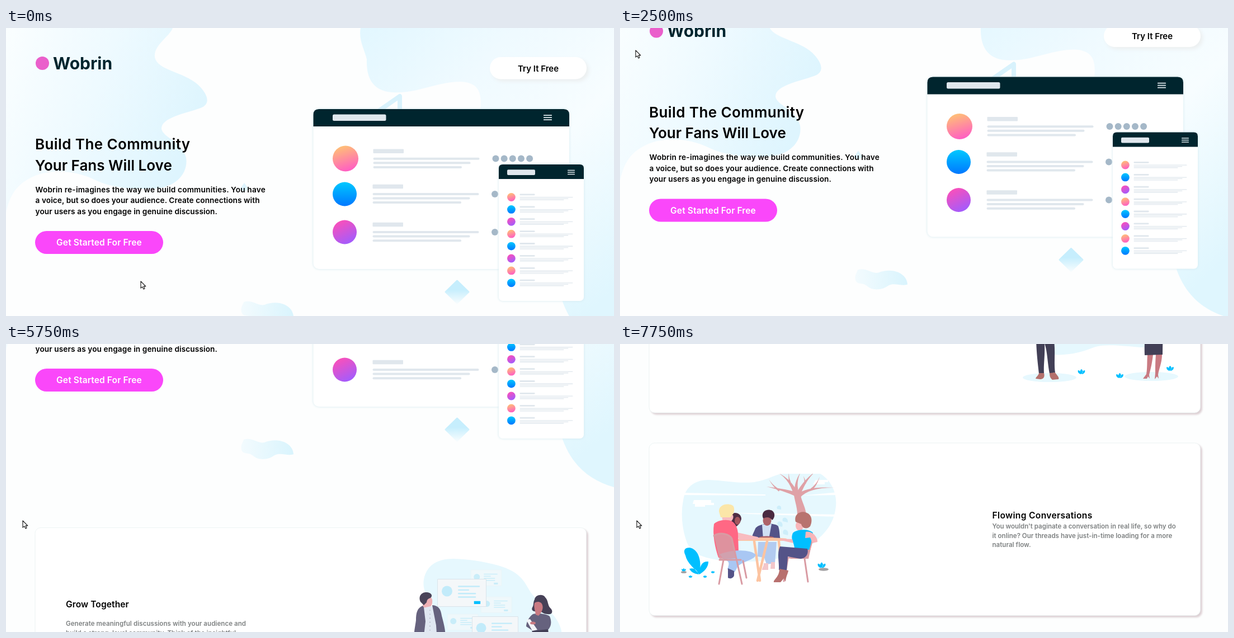
An HTML page for the animation above (8 s loop, 1087 by 515 pixels).

```html
<!DOCTYPE html>
<html lang="en">
<head>
<meta charset="utf-8">
<title>Landing page scroll</title>
<style>
  html, body { margin: 0; width: 100%; height: 100%; overflow: hidden; background: #fdfefe; }
  svg { display: block; width: 100%; height: 100%; }
  text { font-family: Inter, "Open Sans", sans-serif; font-weight: 600; white-space: pre; }
  .soft { filter: drop-shadow(0 0 2px #d3e8ee); }
  .pill { filter: drop-shadow(4px 4px 3px #eceff0); }
  .card { filter: drop-shadow(3.5px 3.5px 1.5px #ddd0d4); }
</style>
</head>
<body>
<svg viewBox="0 0 1087 515" preserveAspectRatio="none">
  <defs>
    <linearGradient id="left" x1="0" y1="0" x2="1" y2=".35">
      <stop offset="0" stop-color="#fafeff"/><stop offset=".5" stop-color="#eefaff"/><stop offset="1" stop-color="#def5fe"/>
    </linearGradient>
    <linearGradient id="right" x1="0" y1="0" x2=".75" y2="1">
      <stop offset="0" stop-color="#e2f7ff"/><stop offset=".3" stop-color="#effaff"/>
      <stop offset=".6" stop-color="#f7fdff"/><stop offset="1" stop-color="#dff6fe"/>
    </linearGradient>
    <linearGradient id="wave"><stop offset="0" stop-color="#f3fbfe"/><stop offset="1" stop-color="#d9f4fd"/></linearGradient>
    <linearGradient id="gem" x1="0" y1="0" x2="0" y2="1">
      <stop offset=".4" stop-color="#c6eefd"/><stop offset="1" stop-color="#f6fcfe"/>
    </linearGradient>
    <linearGradient id="peach" x1=".3" y1="0" x2=".6" y2="1"><stop offset="0" stop-color="#ffc274"/><stop offset="1" stop-color="#ff5cc4"/></linearGradient>
    <linearGradient id="blue" x1="0" y1="0" x2="0" y2="1"><stop offset="0" stop-color="#00c8ff"/><stop offset="1" stop-color="#0078ff"/></linearGradient>
    <linearGradient id="violet" x1=".2" y1="0" x2=".7" y2="1"><stop offset="0" stop-color="#ff4fb6"/><stop offset="1" stop-color="#a05cff"/></linearGradient>
    <clipPath id="sky"><path d="M100 232H400V440H100Z"/></clipPath>
  </defs>
  <g id="page"></g>
  <path id="cursor" d="M0 0V12.2L2.8 9.8 5 14 7 13 5.1 8.9H8.8Z" fill="#fff" stroke="#111" stroke-width="1.1" stroke-linejoin="round"/>
</svg>
<script>
const page = document.getElementById('page');
const cursor = document.getElementById('cursor');
const INK = '#00252e', PALE = '#e0e7ed', SKY = '#e6f8fe', CYAN = '#00bfff';

const path = (fill, d, more = '') => `<path d="${d}" fill="${fill}" ${more}/>`;
const line = (color, width, d, more = '') =>
  path('none', d, `stroke="${color}" stroke-width="${width}" stroke-linecap="round" stroke-linejoin="round" ${more}`);
const disc = (x, y, r, fill) => `<circle cx="${x}" cy="${y}" r="${r}" fill="${fill}"/>`;
const oval = (x, y, rx, ry, fill) => `<ellipse cx="${x}" cy="${y}" rx="${rx}" ry="${ry}" fill="${fill}"/>`;
const box = (x, y, w, h, fill, r = 0, more = '') =>
  `<rect x="${x}" y="${y}" width="${w}" height="${h}" rx="${r}" fill="${fill}" ${more}/>`;
const text = (x, y, size, str, gap = 0, more = '') =>
  `<text x="${x}" y="${y}" font-size="${size}" letter-spacing="${gap}" ${more}>${str}</text>`;
const group = (y, body, more = '') => `<g transform="translate(0 ${y})" ${more}>${body}</g>`;
const tints = ['url(#peach)', 'url(#blue)', 'url(#violet)'];

function backdrop() {
  return path('url(#left)', `M0 0H298C292 16 264 30 266 52C270 76 318 78 344 102C362 120 366 136 348 143
      C320 153 278 160 278 180C280 196 316 204 322 232C326 258 306 284 268 287C220 291 180 282 160 272
      C120 252 70 252 40 270C15 284 6 304 0 330Z`)
    + path('url(#right)', `M634 0C630 22 641 38 645 56C644 84 652 112 690 115C735 118 770 96 812 96
      C842 97 852 112 848 146C850 260 950 360 990 472C1004 530 1040 562 1087 575V0Z`)
    + line('#d8f2fc', 8, 'M668 147L704 122V147')
    + path('#def4fd', 'M418 288L426 277L434 288L426 293Z')
    + path('url(#wave)', `M425 490C440 485 450 498 462 495C485 486 512 494 514 516C505 520 490 512 480 518
      C468 527 450 527 442 519C432 511 424 518 421 508C419 500 423 496 425 490Z`)
    + path('url(#gem)', 'M806.5 452L827 472L806.5 492L786 472Z', 'stroke="url(#gem)" stroke-width="3" stroke-linejoin="round"');
}

function hero() {
  return disc(65, 63, 12, '#ea5fcb')
    + text(84, 73.5, 30, 'Wobrin', 0, `fill="${INK}" style="font-weight:700"`)
    + box(865, 52, 173, 39.5, '#fff', 19.7, 'class="pill"')
    + text(951.5, 77.5, 15, 'Try It Free', 0, 'text-anchor="middle"')
    + text(52, 217.3, 26, 'Build The Community', .4)
    + text(52, 254.5, 26, 'Your Fans Will Love')
    + text(52.5, 293.7, 13.6, 'Wobrin re-imagines the way we build communities. You have', .22)
    + text(52.5, 313.3, 13.6, 'a voice, but so does your audience. Create connections with', .1)
    + text(52.5, 332.9, 13.6, 'your users as you engage in genuine discussion.', .13)
    + box(52, 363, 229, 41, '#fa47fa', 20.5)
    + text(166.5, 389, 15.5, 'Get Started For Free', .13, 'text-anchor="middle" fill="#fff"');
}

const burger = (x, y, w, step, weight) =>
  [0, 1, 2].map(i => box(x, y + i * step, w, weight, '#dfe7ec', .6)).join('');

function entry(x, y, lengths, titleWidth, titleHeight, offset, step, weight) {
  return box(x, y, titleWidth, titleHeight, PALE, 1)
    + lengths.map((w, i) => box(x, y + offset + i * step, w, weight, PALE, weight / 2)).join('');
}

function screens() {
  let out = '<g class="soft">' + box(549.5, 145, 457.5, 286, '#fff', 10) + '</g>'
    + path(INK, 'M549.5 176V155Q549.5 145 559.5 145H997Q1007 145 1007 155V176Z')
    + box(584, 154.5, 95.5, 11.5, PALE, 2.5) + burger(961, 155.2, 15, 4, 1.8)
    + disc(607, 233.5, 23, tints[0]) + disc(605.5, 297, 21.5, tints[1]) + disc(605.5, 365, 21.5, tints[2]);
  [[656.5, 216.5], [655.5, 279.7], [655.5, 347.8]].forEach(([x, y]) => {
    out += entry(x, y, [190, 174, 158.5], 54.5, 7.5, 15.2, 7.6, 4);
  });
  for (let i = 0; i < 5; i++) out += disc(875.5 + i * 15.15, 233.5, 6, '#a5b8c8');
  out += disc(874, 297, 6, '#a5b8c8') + disc(874, 365, 6, '#a5b8c8')
    + '<g class="soft">' + box(881, 244, 152, 244, '#fff', 7) + '</g>'
    + path(INK, 'M881 270V251Q881 244 888 244H1026Q1033 244 1033 251V270Z')
    + box(896, 253.3, 50, 9.6, PALE, 2) + burger(1004, 253.8, 13, 3.5, 1.5);
  for (let i = 0; i < 8; i++) {
    const y = 302.5 + i * 21.9;
    out += disc(903.4, y, 7.4, tints[i % 3]) + entry(918.5, y - 6, [95, 87, 79], 27, 2.8, 5.5, 2.4, 1.3);
  }
  return out;
}

const card = (y, h) => '<g class="card">' + box(52, y, 985.5, h, '#fff', 10, 'stroke="#e9f1f2" stroke-width=".8"') + '</g>';

const sprout = (x, y, s = 1) => `<g transform="translate(${x} ${y}) scale(${s})">`
  + path(CYAN, 'M0 4C-4 0-2-4 0-5C2-4 4 0 0 4ZM-1 4C-6 3-7-1-6-3C-3-3-1 0-1 4ZM1 4C6 3 7-1 6-3C3-3 1 0 1 4Z') + '</g>';

function panel(x, y, w, h, r, lengths, button, fill, edge, tint) {
  const lx = x + w * .42, gap = h * .13;
  return box(x, y, w, h, fill, .5, `stroke="${edge}" stroke-width=".8"`)
    + disc(x + w * .195, y + h * .44, r, tint)
    + lengths.map((k, i) => box(lx, y + h * .24 + i * gap, w * k, h * .05, tint, h * .025)).join('')
    + box(x + w * .75, y + h * .8, w * .13, h * .11, button, .5);
}

function together() {
  const lines = [.45, .23, .37, .37];
  const faint = (x, y) => panel(x, y, 55, 28.5, 5.5, lines, '#c9edf9', '#eff8fb', '#e8f4f8', '#c9edf9');
  return path(SKY, `M747 140C752 112 775 103 800 103C830 104 850 107 880 115C915 125 925 140 935 158
      C942 172 960 185 975 200C990 215 996 235 993 245C988 262 968 268 930 269C895 266 870 263 850 268
      C825 278 800 284 775 282C760 280 762 262 768 245C776 225 772 195 758 178C748 165 745 152 747 140Z`)
    + oval(768, 323, 48, 8, SKY) + oval(950, 321, 48, 8, SKY)
    + faint(831, 123) + faint(849, 171) + faint(789, 202)
    + panel(771.5, 139.5, 87, 49, 9.5, lines, CYAN, '#f4f7f9', '#d5dfe6', '#c2ebfa')
    + panel(833.5, 206.5, 82, 46, 9, lines, '#6dd6fb', '#f4f7f9', '#d5dfe6', '#c2ebfa')
    // standing man
    + path('#eeb0b4', 'M748 175C751 169 760 169 762 176C763 184 760 189 757 189L755 194H746L745 184Z')
    + path('#4a4459', 'M741 180C736 168 745 162 753 163C760 164 763 168 760 172C757 175 753 173 752 181L747 186Z')
    + path('#e0e7f1', 'M745 191L764 187L772 222V249L745 250L748 215Z')
    + path('#66627e', `M745 187C735 191 733 200 733 213C731 228 728 238 731 246L738 253L746 250L750 215L747 190Z
      M762 186C774 187 777 193 779 205C783 220 786 232 785 239C781 246 777 250 771 252L769 222Z`)
    + line('#7d7b90', 1.2, 'M758 195V246', 'stroke-dasharray=".1 7"')
    + path('#423f56', `M744 249L774 248C780 270 775 295 778 314L768 316C764 295 764 275 759 262
      C760 285 757 300 758 315L749 316C746 290 744 270 744 249Z`)
    + path('#b4706c', `M749 315H758C760 322 757 326 751 326L743 325C744 321 748 320 749 315Z
      M768 315L778 314C780 318 786 322 784 326L773 327C769 324 768 320 768 315Z`)
    // standing woman
    + path('#c97a82', `M943 282H953C951 300 948 310 946 318L947 325L944 321L942 325H935L941 317C943 305 942 295 943 282Z
      M958 282H969C969 297 963 309 962 318L963 325L960 321L956 326L957 315C957 305 957 295 958 282Z`)
    + path('#423f56', 'M941 229L969 227C971 245 970 265 970 282L938 283C937 262 939 245 941 229Z')
    + path('#474157', `M945 176C946 167 960 165 964 172C970 178 968 186 973 191C979 196 977 204 968 202
      C960 202 955 195 951 196C945 199 938 196 941 190C944 186 942 181 945 176Z`)
    + path('#66627e', 'M942 202C935 207 930 217 930 224L942 232L970 229C976 222 975 213 972 206C966 201 950 200 942 202Z')
    + path('#c97a82', 'M945 182C950 178 958 180 959 186C961 192 958 199 952 205L947 203C946 195 943 189 945 182Z')
    + path('#f3f4f8', 'M930 212L937 211L950 230L941 232Z') + oval(942, 218, 5, 2.5, '#c97a82')
    + sprout(825, 313) + sprout(893.5, 320) + sprout(983.5, 307);
}

// Tapered branch from (x, y) to its tip, bent towards (cx, cy).
const limb = (x, y, w, cx, cy, tx, ty) => {
  const k = w / 2 / Math.hypot(cx - x, cy - y), nx = (y - cy) * k, ny = (cx - x) * k;
  return path('#dfa1a6', `M${x + nx} ${y + ny}Q${cx + nx / 2} ${cy + ny / 2} ${tx} ${ty}`
    + `Q${cx - nx / 2} ${cy - ny / 2} ${x - nx} ${y - ny}Z`);
};

function gathering() {
  const chair = '#d99ba3', navy = '#545388';
  const tree = path('#dfa1a6', 'M317 305C317 290 311 278 310 262H322C322 278 331 288 333 305Z')
    + limb(316, 269, 8, 295, 261, 262, 255) + limb(285, 262, 4, 275, 256, 266, 242)
    + limb(314, 268, 8, 306, 244, 284, 231) + limb(304, 247, 3, 301, 240, 302, 230)
    + limb(316, 268, 8, 312, 248, 323, 229) + limb(319, 268, 8, 330, 244, 348, 229)
    + limb(319, 272, 8, 336, 255, 384, 257) + limb(342, 260, 4, 352, 252, 357, 237)
    + limb(331, 250, 3, 331, 243, 328, 236);
  return path(SKY, `M113 280C116 255 135 243 158 243C190 244 210 250 240 247C265 243 272 235 290 232H358
      C380 245 388 270 386 290C383 317 372 334 350 352C320 384 250 392 200 388C150 386 125 375 118 350
      C110 325 109 300 113 280Z`)
    + path('#fff', `M112 266L260 269V271L112 270ZM132 279H163V284H168V288H152V291H134V286H130Z
      M205 302L390 305V309L230 304ZM350 243H372V247H366V251H345ZM325 271L390 265V270Z`)
    + path('#cdeefa', 'M281 295C278 288 290 286 288 296ZM291 317C288 308 301 308 300 319ZM282 325C278 313 294 316 290 327ZM292 340C288 328 304 330 300 342Z')
    + tree
    // middle sitter
    + path('#b2cbf0', 'M247 354H280L277 392L262 394L258 382L246 380Z')
    + path('#f3c6ca', 'M257 392H265V404H254C254 400 257 398 257 392ZM270 390H277V402H269Z')
    + path(navy, 'M242 330C248 320 278 319 283 326C286 335 285 345 287 349H237C234 345 239 338 242 330Z')
    + path('#cfe0f4', 'M254 323L271 322L266 349H256Z')
    + oval(263, 316, 7.5, 9, '#ad6268')
    + path('#4a2a40', 'M255 309C253 298 264 294 272 298C279 303 276 312 272 315C268 309 262 309 256 312Z')
    + oval(262, 346, 13, 2.6, '#ad6268')
    // woman on the left
    + path('#4f2d44', 'M197 306C205 298 217 303 217 313C214 324 206 330 200 326Z')
    + oval(210, 316, 5, 7, '#a4565e')
    // table
    + line('#fcc4a1', 4.5, 'M240 353L250 423M263 353L246 423M284 353L290 413')
    + path('#fcc4a1', 'M207 349C225 346 280 345 298 348V352H207Z')
    // man on the left
    + path('#f8bcc0', 'M182 306H202C204 312 200 316 196 320H184ZM205 336L246 345L251 349L214 351Z')
    + path('#fbe6a8', 'M177 300C176 288 190 284 200 288C206 291 204 299 203 303L197 310H180Z')
    + path('#ff6884', 'M168 322C172 316 190 312 200 317C208 322 211 332 211 341L212 372C205 382 190 384 176 382C170 365 165 340 168 322Z')
    + path('#a9c7f3', 'M178 376C205 366 235 368 243 377C240 386 222 388 211 397L205 408L192 403C196 392 196 388 186 386Z')
    + path(navy, 'M193 401L204 406V414C202 420 195 420 193 418Z')
    + path(chair, 'M168 343C178 336 195 339 200 348L208 383L178 386Z', 'opacity=".85"')
    + line(chair, 3, 'M168 343C178 336 195 339 200 348L208 384L218 429M178 386H216M185 386L177 429M220 388L226 418')
    // man on the right
    + line(chair, 3, 'M346 342L335 382H300M330 384L336 425M300 384L293 424')
    + path(chair, 'M338 356L346 342L337 384H304L310 378Z')
    + oval(321, 325, 7, 9, '#f8b6ba')
    + path('#b8736f', 'M314 318C310 303 325 297 334 302C344 306 344 318 340 326C334 332 326 330 324 322Z')
    + path(CYAN, 'M309 338C318 330 340 331 345 338L341 358L338 368L312 366C312 355 304 350 309 338Z')
    + path('#f8b6ba', 'M332 336C344 333 354 347 353 354L344 356L340 346L331 347ZM310 356L288 351L284 348L308 349Z')
    + path(navy, 'M286 362L335 366C338 375 332 384 322 384L300 380L298 405L284 404C285 390 280 375 286 362Z')
    + path('#b8706e', 'M285 402L301 405C300 412 297 414 296 425L293 419L287 426H275C274 421 285 417 285 402Z')
    // plants and stones
    + oval(114, 408, 5, 2, '#a3a1a3') + oval(364, 403, 9, 2.8, '#a3a1a3')
    + path(CYAN, `M117 378C110 365 122 362 130 366C142 373 146 390 142 412C132 400 120 392 117 378Z
      M142 412C142 395 148 388 158 389C158 400 150 407 142 412ZM141 412C136 401 130 400 124 402C128 409 134 411 141 412Z`)
    + sprout(126, 416, .5) + sprout(152, 416, .5) + sprout(166, 408, .5) + sprout(114, 404, .6) + sprout(360.5, 396, 1.1);
}

function cards() {
  const gray = 'fill="#7d8081"';
  return card(647.5, 338.5)
    + text(107, 790.3, 15.6, 'Grow Together', .08)
    + text(107, 823, 11.5, 'Generate meaningful discussions with your audience and', .07, gray)
    + text(107, 839.8, 11.5, 'build a strong, loyal community. Think of the insightful', .06, gray)
    + text(107, 856.5, 11.5, 'conversations you miss out on with a feedback form.', .02, gray)
    + group(600, together())
    + card(1040, 308.5)
    + text(665.5, 1174.6, 15.6, 'Flowing Conversations', .33)
    + text(665.5, 1193.2, 11.5, "You wouldn't paginate a conversation in real life, so why do", 0, gray)
    + text(665.5, 1209.8, 11.5, 'it online? Our threads have just-in-time loading for a more', .03, gray)
    + text(665.5, 1226.4, 11.5, 'natural flow.', .05, gray)
    + group(863, gathering(), 'clip-path="url(#sky)"');
}

page.innerHTML = backdrop() + hero() + screens() + cards();

// [time, value...]
const scrollKeys = [[0, 0], [2000, 0], [2250, 22], [2500, 57.5], [4000, 57.5], [4250, 66], [4500, 115],
  [4750, 172.5], [5250, 287.5], [5500, 290], [5750, 319], [6000, 400], [6250, 505], [6500, 575],
  [6750, 578], [7000, 600], [7250, 690], [7500, 800], [7750, 863]];
const cursorKeys = [[0, 241, 453], [1000, 28, 40], [2750, 28, 40], [3250, 120, 300], [3500, 160, 470],
  [3750, 40, 400], [4000, 30, 314], [5250, 30, 314], [5500, 30, 316]];

function sample(keys, t) {
  const i = keys.findIndex(k => k[0] > t);
  if (i < 0) return keys[keys.length - 1].slice(1);
  const a = keys[i - 1], b = keys[i], u = (t - a[0]) / (b[0] - a[0]);
  return a.slice(1).map((v, j) => v + (b[j + 1] - v) * u);
}

const LOOP = 8000, STEP = 250;
const start = performance.now();

function draw(now) {
  const t = Math.floor(Math.max(0, now - start) % LOOP / STEP) * STEP;
  const [y] = sample(scrollKeys, t);
  page.setAttribute('transform', `translate(0 ${-y})`);
  cursor.setAttribute('transform', `translate(${sample(cursorKeys, t).join(' ')})`);
  requestAnimationFrame(draw);
}
draw(start);
</script>
</body>
</html>
```
